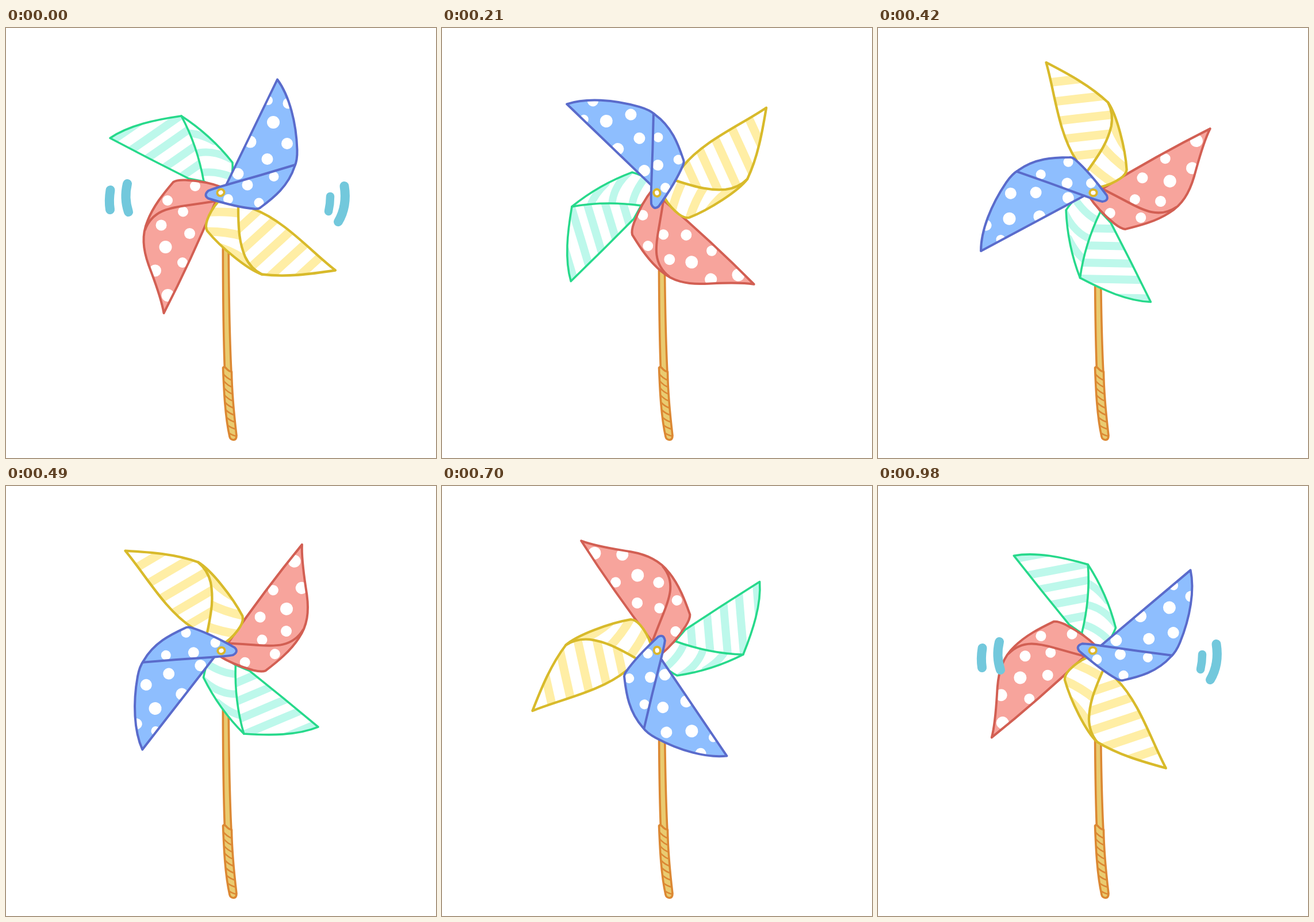
Animation, 748 px wide and 748 px high, one loop 1.05 s. Source, as an HTML page with a canvas:

```html
<!DOCTYPE html>
<html lang="en">
<head>
<meta charset="utf-8">
<title>Pinwheel</title>
<style>
  html, body { margin: 0; width: 100%; height: 100%; overflow: hidden; background: #fff; }
  canvas { display: block; width: 748px; height: 748px; }
</style>
</head>
<body>
<canvas id="stage" width="748" height="748"></canvas>
<script>
const ctx = document.getElementById('stage').getContext('2d');
const STEP = 70, STEPS = 15, CX = 374, CY = 286.3;
const rad = deg => deg * Math.PI / 180;

function stroke(d, color, width) {
  ctx.strokeStyle = color;
  ctx.lineWidth = width;
  ctx.stroke(new Path2D(d));
}

function fill(d, color) {
  ctx.fillStyle = color;
  ctx.fill(new Path2D(d));
}

function clipped(d, draw) {
  ctx.save();
  ctx.clip(new Path2D(d));
  draw();
  ctx.restore();
}

// Parallel bands at the given distances from the hub
function bands(angle, offsets, color, width) {
  ctx.save();
  ctx.translate(CX, CY);
  ctx.rotate(rad(angle));
  for (const y of offsets) stroke(`M-150 ${y}Q0 ${y - 2} 150 ${y}`, color, width);
  ctx.restore();
}

// Each dot is [x, y, radius]
function dots(list) {
  ctx.fillStyle = '#fff';
  for (const [x, y, r] of list) {
    ctx.beginPath();
    ctx.arc(x, y, r, 0, Math.PI * 2);
    ctx.fill();
  }
}

const green = {
  line: '#27d98b', width: 3.6, base: '#fff',
  body: 'M181 191.5C214 169 260 159.5 305 153Q356 186 394 234Q395 250 391 264L378 282L344 267L318 262Q250 228 181 191.5Z',
  fold: 'M305 153C325 190 337 228 344 267',
  pattern() {
    const mint = '#bdf8eb';
    clipped('M150 191L181 140L305 153C325 190 337 228 344 267L320 280Z',
      () => bands(145, [63, 93, 123, 151, 183], mint, 14));
    clipped('M305 153C325 190 337 228 344 267L378 290L420 234L370 170Z', () =>
      stroke('M308 183Q332 181 362 197M324 220Q359 208 398 232M338 252Q365 247 398 261', mint, 13));
  }
};

const red = {
  line: '#d25f53', width: 4, base: '#f7a49c',
  body: 'M274.5 496C270 468 256 434 248 412C238 384 236 360 246 336C256 310 274 288 291 268Q297 264 312 264.5C338 266 358 270 376 277L364.5 302Q322 404 274.5 496Z',
  fold: 'M242 351C254 318 284 313 312 309Q340 305 366 301',
  pattern() {
    dots([[329, 275, 9], [281, 300, 9], [308, 319.5, 9], [270, 343, 9.5], [319.5, 357.5, 9.5],
      [277.5, 381, 11], [307, 408, 9], [259.5, 422, 10.5], [281.5, 465, 11]]);
  }
};

const yellow = {
  line: '#d8ba2b', width: 4.3, base: '#fff',
  body: 'M573 421.5C530 428 487 434 445 428.5C420 420 374 382 350 353Q346 346 350 334Q356 317 369 302L402 305Q418 308 431 315C484 335 530 388 573 421.5Z',
  fold: 'M404 310C404 352 406 374 416 398Q426 419 445 428.5',
  pattern() {
    const cream = '#ffeea5';
    clipped('M404 300C404 352 406 374 416 398Q426 419 445 429L600 450L590 410L440 290Z',
      () => bands(137.5, [-198, -164, -130, -97.5, -66], cream, 15));
    clipped('M404 300C404 352 406 374 416 398Q426 419 445 429L330 400L340 290Z', () =>
      stroke('M345 321Q380 318 410 323M344 354Q380 353 412 362M372 382Q400 391 426 411', cream, 15));
  }
};

const blue = {
  line: '#5a6bcb', width: 4, base: '#8ebefe',
  body: 'M472 89.5C493 118 505 165 506.5 212Q507 230 502 241C491 275 466 295 443 312Q439 315.5 432 314.5C404 312 376 304 352 296.5Q343 291 352 283Q362 279 383 273Z',
  fold: 'M383 273Q444 256 503 238',
  pattern() {
    dots([[491, 131, 9.5], [456, 126, 8], [465, 164, 11], [489, 201, 10], [425, 198, 10.5], [454.5, 228, 10],
      [403.5, 253.5, 10], [466, 258.5, 8.5], [420, 273, 9.5], [386.5, 297.5, 8.5], [440, 304, 8.5]]);
  }
};

function blade(b) {
  fill(b.body, b.base);
  clipped(b.body, () => b.pattern());
  stroke(b.fold, b.line, b.width);
  stroke(b.body, b.line, b.width);
}

function stick() {
  const line = '#dc8833', wood = '#e9cb70';
  const pole = 'M377.5 310C377 420 377 500 380.5 596L392 600C388 520 387 430 387 310Z';
  const grip = 'M377.5 591Q379 588 383 592Q387 597 392.5 598C393 640 397 675 401 709Q401 716 396 716.5Q390 716 389 711C381 675 379 630 377.5 591Z';
  fill(pole, wood);
  stroke(pole, line, 3.6);
  fill(grip, wood);
  clipped(grip, () => {
    for (let i = 0; i < 9; i++) {
      const y = 599 + i * 13, x = 376 + i * 1.2, drop = 14 - i * 0.8;
      stroke(`M${x} ${y}Q${x + 8} ${y + drop * 0.8} ${x + 18} ${y + drop}`, line, 2.6);
    }
  });
  stroke(grip, line, 3.6);
}

function hub() {
  ctx.beginPath();
  ctx.ellipse(373.5, 286.3, 6.2, 5.6, -0.6, 0, Math.PI * 2);
  ctx.fillStyle = '#fff';
  ctx.fill();
  ctx.strokeStyle = '#dab62c';
  ctx.lineWidth = 4;
  ctx.stroke();
}

function swishes() {
  const teal = '#72c8dc';
  stroke('M181.5 282Q178.5 300 181 316M211 271Q205 296 213 320', teal, 16);
  stroke('M564 293Q564 306 561 319', teal, 14.5);
  stroke('M588.5 275Q594 310 578 337', teal, 16);
}

function render(now) {
  const step = Math.floor(now / STEP) % STEPS;
  ctx.fillStyle = '#fff';
  ctx.fillRect(0, 0, 748, 748);
  ctx.lineJoin = ctx.lineCap = 'round';
  stick();
  ctx.save();
  ctx.translate(CX, CY);
  ctx.rotate(-rad(step * 360 / STEPS));
  ctx.translate(-CX, -CY);
  [green, red, yellow, blue].forEach(blade);
  hub();
  ctx.restore();
  if (step < 2 || step === STEPS - 1) swishes();
}

let start;
function tick(now) {
  start ??= now;
  render(now - start);
  requestAnimationFrame(tick);
}
render(0);
requestAnimationFrame(tick);
</script>
</body>
</html>
```
